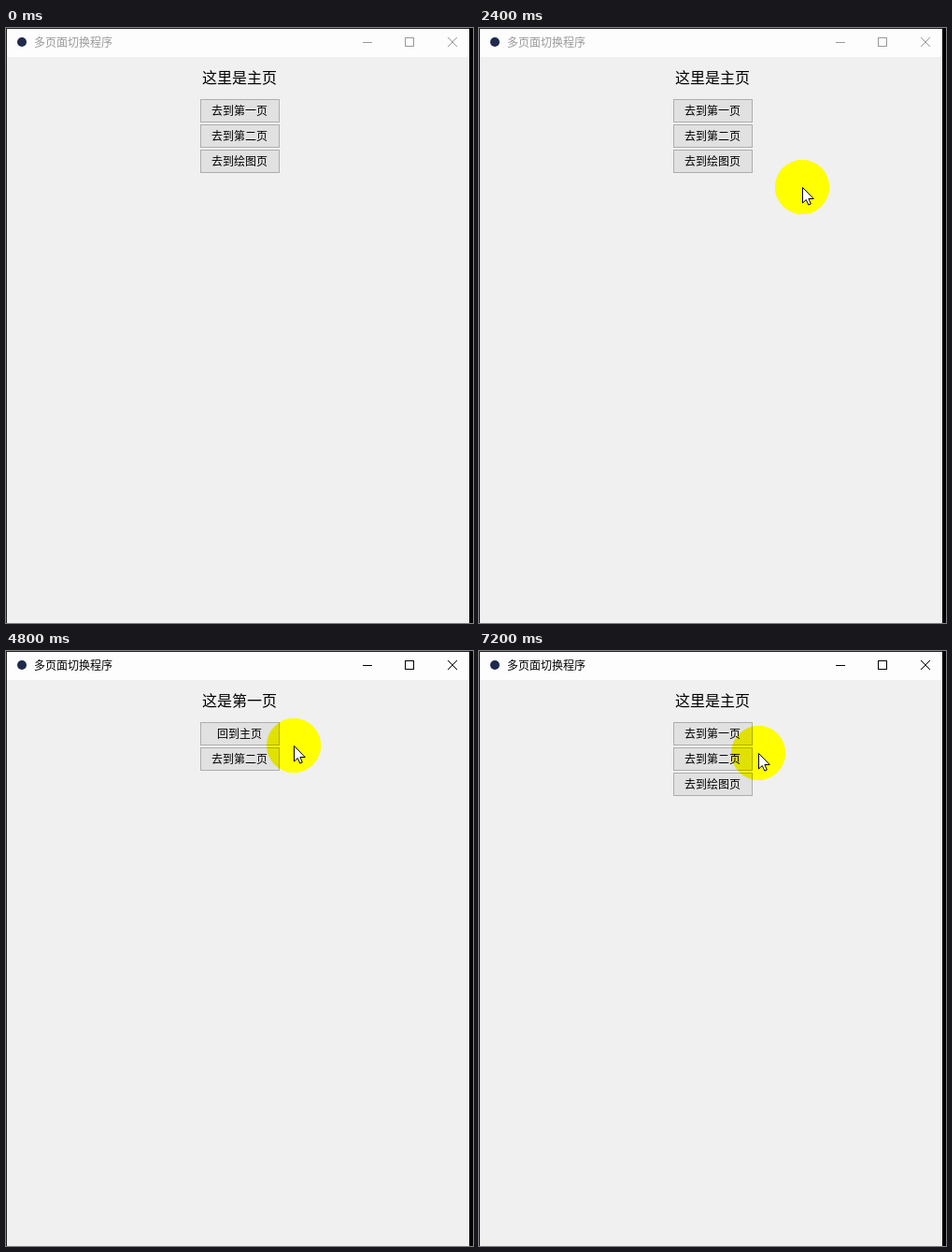
An HTML page with a canvas that plays this animation: 500x636 px, repeating every 8 s.

```html
<!DOCTYPE html>
<html lang="zh-CN">
<head>
<meta charset="utf-8">
<style>
html, body { margin: 0; height: 100%; overflow: hidden; background: #f0f0f0; }
canvas { display: block; }
</style>
</head>
<body>
<canvas id="stage" width="500" height="636"></canvas>
<script>
const ctx = document.getElementById('stage').getContext('2d');
const FONT = '"Noto Sans CJK SC", "Noto Sans CJK", sans-serif';
const STEP = 800;

const home = { title: '这里是主页', buttons: ['去到第一页', '去到第二页', '去到绘图页'] };
const first = { title: '这是第一页', buttons: ['回到主页', '去到第二页'] };

// [fill, border] of a button
const normal = ['#e1e1e1', '#adadad'];
const hover = ['#e5f1fb', '#0078d7'];
const pressed = ['#d9ecf9', '#1a68b0'];

// One pose per step; top is the look of the uppermost button
const poses = [
  { page: home },
  { page: home, pointer: [437, 415] },
  { page: home, pointer: [409, 254.5] },
  { page: home, pointer: [346, 170] },
  { page: home, pointer: [262, 94], top: hover },
  { page: home, pointer: [251, 87], top: hover },
  { page: first, pointer: [308, 101], active: true },
  { page: first, pointer: [268, 93], active: true, top: hover },
  { page: home, pointer: [267, 87], active: true, top: pressed },
  { page: home, pointer: [299, 109], active: true },
];

function rect(color, x, y, w, h) {
  ctx.fillStyle = color;
  ctx.fillRect(x, y, w, h);
}

function disc(color, x, y, r) {
  ctx.fillStyle = color;
  ctx.beginPath();
  ctx.arc(x, y, r, 0, Math.PI * 2);
  ctx.fill();
}

// Text is centred vertically on y
function text(string, x, y, size, color, align = 'center') {
  ctx.font = `${size}px ${FONT}`;
  ctx.textAlign = align;
  ctx.fillStyle = color;
  ctx.fillText(string, x, Math.round(y + size * 0.38));
}

function drawWindow(active) {
  const ink = active ? '#000' : '#999';
  rect('#f0f0f0', 0, 0, 500, 636);
  rect('#fdfdfd', 0, 0, 500, 31);
  disc('#1f2a4d', 17, 15, 5);
  text('多页面切换程序', 30, 15.5, 12, ink, 'left');

  ctx.strokeStyle = ink;
  ctx.lineWidth = 1;
  ctx.strokeRect(427.5, 10.5, 9, 9);
  ctx.beginPath();
  ctx.moveTo(382, 15.5);
  ctx.lineTo(392, 15.5);
  ctx.moveTo(473, 10);
  ctx.lineTo(483, 20);
  ctx.moveTo(483, 10);
  ctx.lineTo(473, 20);
  ctx.stroke();

  rect('#222', 0, 0, 500, 1);
  rect('#222', 0, 0, 1, 636);
  rect('#000', 496, 0, 4, 636);
}

function drawPage(page, top = normal) {
  text(page.title, 250, 53, 16, '#000');
  page.buttons.forEach((label, i) => {
    const y = 76 + i * 27;
    const [fill, border] = i ? normal : top;
    rect(border, 208, y, 85, 25);
    rect(fill, 209, y + 1, 83, 23);
    text(label, 250, y + 12.5, 12, '#000');
  });
}

function drawArrow(x, y) {
  const arrow = new Path2D('M0 0V16.5L3.8 13 6.3 18.6 8.8 17.5 6.4 12H11.7Z');
  ctx.save();
  ctx.translate(x + 0.5, Math.round(y) + 0.5);
  ctx.fillStyle = '#fff';
  ctx.strokeStyle = '#000';
  ctx.fill(arrow);
  ctx.stroke(arrow);
  ctx.restore();
}

function draw(now) {
  const { page, pointer, active, top } = poses[Math.floor(now / STEP) % poses.length];
  drawWindow(active);
  if (pointer) disc('#ff0', ...pointer, 29);
  drawPage(page, top);
  if (pointer) {
    // Tint the buttons under the spotlight
    ctx.globalCompositeOperation = 'multiply';
    disc('#ff0', ...pointer, 29);
    ctx.globalCompositeOperation = 'source-over';
    drawArrow(...pointer);
  }
  requestAnimationFrame(draw);
}
requestAnimationFrame(draw);
</script>
</body>
</html>
```
